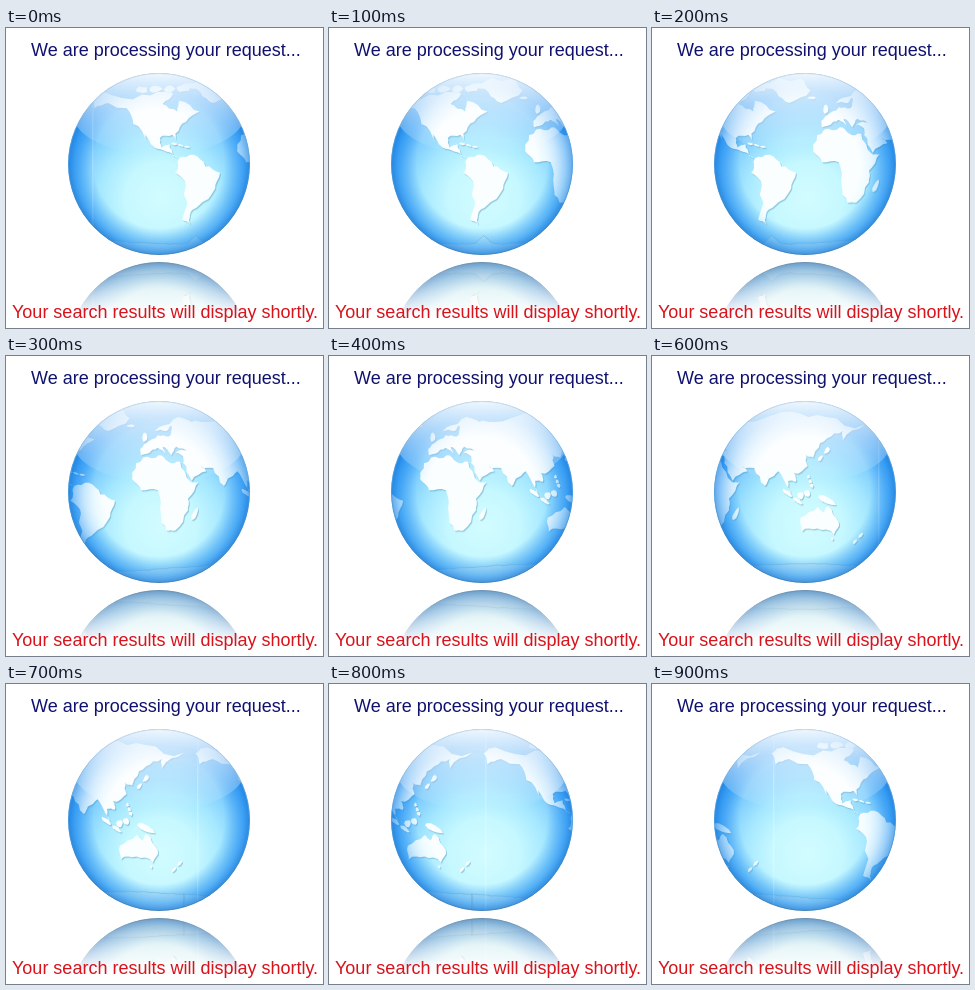
These frames come from a looping animation (317 by 300 pixels, 1 s). An HTML page:

```html
<!DOCTYPE html>
<html lang="en">
<head>
<meta charset="utf-8">
<title>Processing</title>
<style>
  html, body { margin: 0; width: 100%; height: 100%; overflow: hidden; background: #fff; }
  svg { display: block; width: 317px; height: 300px; }
  text { font: 18px "Liberation Sans", Arial, Helvetica, sans-serif; }
  #mirror { filter: saturate(.75) brightness(.95); }
</style>
</head>
<body>
<svg viewBox="0 0 317 300">
  <defs>
    <clipPath id="disc"><circle cx="153" cy="136" r="91"/></clipPath>
    <radialGradient id="sea" gradientUnits="userSpaceOnUse" cx="155" cy="170" r="128">
      <stop offset="0" stop-color="#d2fcff"/>
      <stop offset=".28" stop-color="#c6f8ff"/>
      <stop offset=".48" stop-color="#a6e8ff"/>
      <stop offset=".66" stop-color="#7fcdfd"/>
      <stop offset=".85" stop-color="#4cacf8"/>
      <stop offset="1" stop-color="#4cacf8"/>
    </radialGradient>
    <radialGradient id="rim" gradientUnits="userSpaceOnUse" cx="153" cy="135" r="93">
      <stop offset=".7" stop-color="#1585ee" stop-opacity="0"/>
      <stop offset=".9" stop-color="#1585ee" stop-opacity=".55"/>
      <stop offset="1" stop-color="#1572d0" stop-opacity=".85"/>
    </radialGradient>
    <linearGradient id="gloss" gradientUnits="userSpaceOnUse" x1="0" y1="46" x2="0" y2="126">
      <stop offset="0" stop-color="#fff" stop-opacity=".92"/>
      <stop offset=".45" stop-color="#fff" stop-opacity=".5"/>
      <stop offset="1" stop-color="#fff" stop-opacity="0"/>
    </linearGradient>
    <linearGradient id="line" gradientUnits="userSpaceOnUse" x1="0" y1="45" x2="0" y2="227">
      <stop offset="0" stop-color="#bcd3e4"/>
      <stop offset=".5" stop-color="#4f9fdd"/>
      <stop offset="1" stop-color="#4880ae"/>
    </linearGradient>
    <radialGradient id="edge" gradientUnits="userSpaceOnUse" cx="153" cy="136" r="91">
      <stop offset=".6" stop-color="#fff"/>
      <stop offset=".82" stop-color="#aaa"/>
      <stop offset="1" stop-color="#444"/>
    </radialGradient>
    <mask id="landFade" maskUnits="userSpaceOnUse" x="62" y="45" width="182" height="182">
      <circle cx="153" cy="136" r="91" fill="url(#edge)"/>
    </mask>
    <linearGradient id="down" gradientUnits="userSpaceOnUse" x1="0" y1="234" x2="0" y2="289">
      <stop offset="0" stop-color="#fff" stop-opacity=".85"/>
      <stop offset=".4" stop-color="#fff" stop-opacity=".55"/>
      <stop offset="1" stop-color="#fff" stop-opacity="0"/>
    </linearGradient>
    <mask id="mirrorFade" maskUnits="userSpaceOnUse" x="60" y="232" width="186" height="58">
      <rect x="60" y="232" width="186" height="58" fill="url(#down)"/>
    </mask>
    <g id="world" transform="matrix(.9722 0 0 -1.06 248 138.5)"></g>
    <g id="map">
      <use href="#world" x="-350"/><use href="#world"/><use href="#world" x="350"/>
    </g>
  </defs>
  <g id="mirror" mask="url(#mirrorFade)"></g>
  <g id="globe"></g>
  <text x="25" y="28" fill="#10126e">We are processing your request...</text>
  <text x="6" y="289.5" fill="#d8131b">Your search results will display shortly.</text>
</svg>
<script>
const $ = id => document.getElementById(id);

let seed = 7;
const rand = () => (seed = seed * 16807 % 2147483647) / 2147483647;

// Break each side of an outline at a displaced midpoint
function roughen(pts, amount) {
  return pts.flatMap(([x, y], i) => {
    const [u, v] = pts[(i + 1) % pts.length];
    const k = (rand() - .5) * amount;
    return [[x, y], [(x + u) / 2 + (v - y) * k, (y + v) / 2 - (u - x) * k]];
  });
}

const polygon = (pts, look = "") =>
  `<polygon points="${pts.map(p => p.map(n => n.toFixed(1))).join(" ")}" ${look}/>`;

// Mainland from a few longitude,latitude capes and bays
function coast(text) {
  const pts = text.split(" ").map(p => p.split(",").map(Number));
  return polygon(roughen(roughen(pts, .28), .35));
}

// A row of long islands between two places
function chain(x, y, u, v, count, width) {
  const dx = (u - x) / count, dy = (v - y) / count;
  const length = Math.hypot(dx, dy);
  return Array.from({ length: count }, (_, i) => {
    const ring = Array.from({ length: 9 }, (_, j) => {
      const a = j * Math.PI * 2 / 9, r = .7 + rand() * .5;
      const along = Math.cos(a) * r * .45, across = Math.sin(a) * r * width / 2 / length;
      return [x + dx * (i + .5 + along) - dy * across, y + dy * (i + .5 + along) + dx * across];
    });
    return polygon(ring);
  }).join("");
}

function iceCap() {
  const pts = [[180, -90], [-180, -90]];
  for (let lon = -180; lon <= 180; lon += 4) {
    const spur = 8 * Math.exp(-(((lon + 60) / 6) ** 2));
    pts.push([lon, -70 + 4 * Math.cos((lon - 115) * Math.PI / 180) + spur + rand()]);
  }
  return polygon(pts, 'fill-opacity=".25" stroke="#4b7f9f" stroke-opacity=".45" stroke-width=".8"');
}

const lands = [
  "-168,65 -156,71 -115,68 -83,69 -94,59 -79,52 -77,62 -56,52 -70,42 -81,31 -80,25 -84,30 -97,27 -95,18 -87,21 -83,10 -77,8 -95,16 -106,21 -113,31 -110,23 -124,40 -131,55 -150,60 -164,55",
  "-73,78 -30,83 -20,72 -42,60 -55,70",
  "-77,8 -62,11 -50,0 -35,-6 -40,-21 -57,-37 -66,-46 -66,-55 -74,-50 -70,-18 -81,-6",
  "-6,35 10,37 20,31 32,31 43,12 51,12 40,-4 40,-15 27,-34 18,-34 12,-18 9,4 -8,4 -17,14 -17,21",
  "-9,43 -8,37 3,42 9,44 17,38 14,45 23,37 28,45 42,42 46,67 25,71 6,60 18,60 23,65 21,55 9,56 -3,48",
  "27,39 35,36 35,30 44,13 59,22 49,30 66,25 77,8 81,15 91,22 99,9 104,1 101,13 109,12 107,20 121,27 119,38 127,35 129,41 141,53 157,60 157,51 180,66 140,73 104,78 68,69 40,67 40,42",
  "114,-22 131,-12 137,-17 142,-11 153,-26 148,-38 131,-32 115,-35"
];
$("world").innerHTML = lands.map(coast).join("") +
  chain(-122, 72, -66, 74, 4, 7) +      // Arctic
  chain(-85, 22, -66, 18, 3, 2) +       // Caribbean
  chain(-24, 65, -14, 65, 1, 3) +       // Iceland
  chain(-5, 50, -4, 59, 1, 5) +         // Britain
  chain(44, -25, 50, -12, 1, 5) +       // Madagascar
  chain(131, 31, 144, 45, 2, 4) +       // Japan
  chain(121, 19, 126, 6, 3, 3) +        // Philippines
  chain(95, 5, 116, -9, 2, 4) +         // Sumatra, Java
  chain(110, -2, 124, 2, 2, 7) +        // Borneo, Sulawesi
  chain(131, -1, 150, -10, 1, 7) +      // New Guinea
  chain(145, -42, 148, -42, 1, 3) +     // Tasmania
  chain(167, -47, 178, -36, 2, 3) +     // New Zealand
  iceCap() +
  '<path d="M-166-90V90" stroke="#fff" stroke-opacity=".35" stroke-width=".8"/>';

const ball = `
  <g clip-path="url(#disc)">
    <circle cx="153" cy="136" r="91" fill="url(#sea)"/>
    <circle cx="153" cy="136" r="91" fill="url(#rim)"/>
    <g mask="url(#landFade)">
      <g transform="translate(1 1.2)" opacity=".4"><use class="spin" href="#map" fill="#4788ad"/></g>
      <use class="spin" href="#map" fill="#fbfeff"/>
    </g>
    <ellipse cx="153" cy="86" rx="86" ry="41" fill="url(#gloss)"/>
  </g>
  <circle cx="153" cy="136" r="90.5" fill="none" stroke="url(#line)" stroke-opacity=".7"/>`;
$("globe").innerHTML = ball;
$("mirror").innerHTML = `<g transform="matrix(1 0 0 -1 0 461)">${ball}</g>`;

// One turn in ten equal jumps
for (const el of document.querySelectorAll(".spin")) {
  const turn = el.animate(
    [{ transform: "translateX(0px)" }, { transform: "translateX(-350px)" }],
    { duration: 1000, iterations: Infinity, easing: "steps(10, end)" });
  turn.startTime = 0;
}
</script>
</body>
</html>
```
